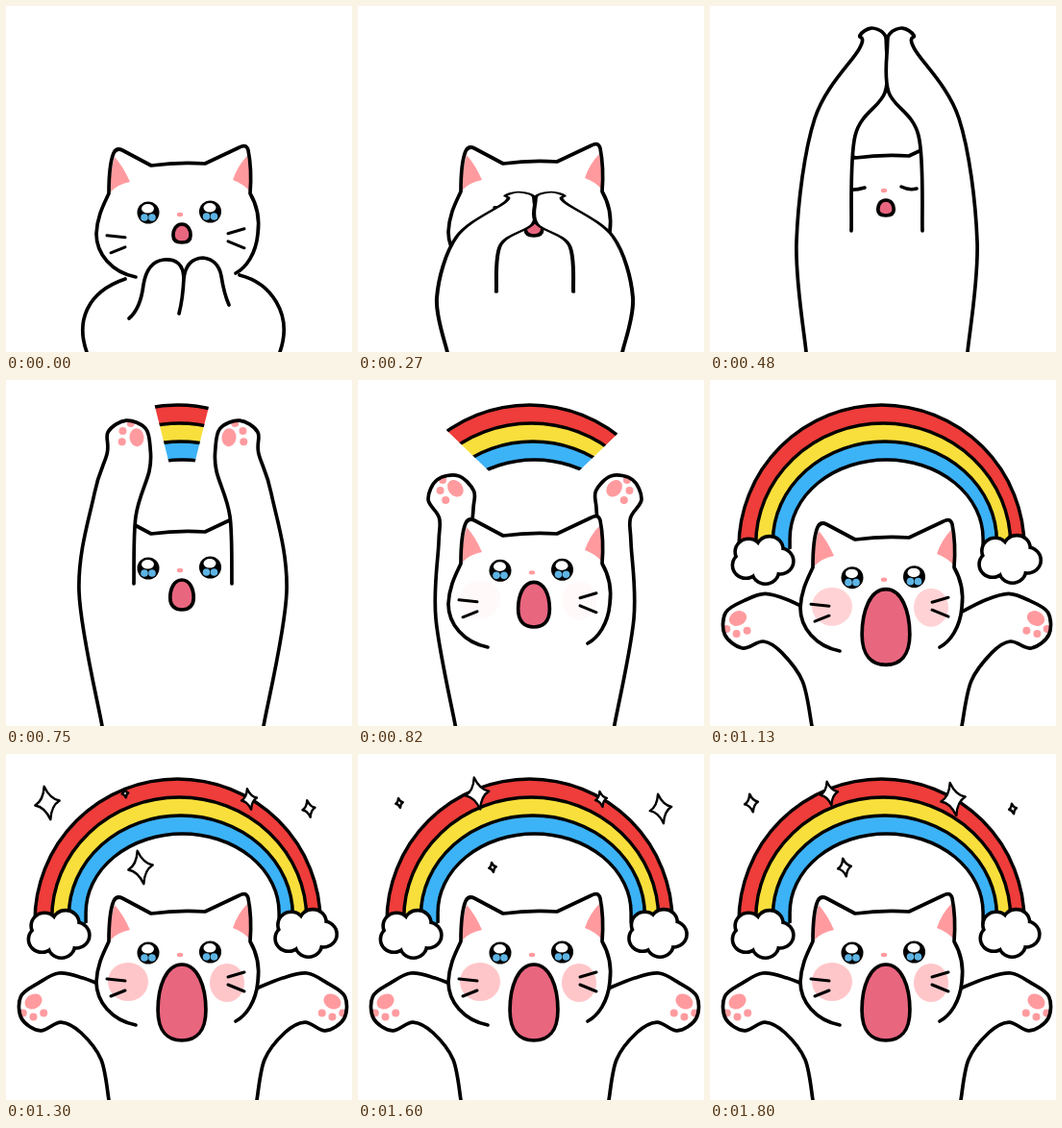
These frames come from a looping animation (360 px wide and 360 px high, 1.9 s). An HTML page with a canvas:

```html
<!DOCTYPE html>
<html lang="en">
<head>
<meta charset="utf-8">
<title>Rainbow cat</title>
<style>
  html, body { margin: 0; width: 100%; height: 100%; overflow: hidden; background: #fff; }
  canvas { display: block; width: 100vw; height: 100vh; }
</style>
</head>
<body>
<canvas id="stage" width="360" height="360"></canvas>
<script>
const ctx = document.getElementById('stage').getContext('2d');
const LOOP = 1900, AXIS = 184, INK = '#000', PINK = '#ff9b9f', BLUSH = '#ffc6c9';
const BANDS = ['#ee3d3a', '#f9df3b', '#3cb2f7'];
const TAU = 2 * Math.PI;
const rad = deg => deg * Math.PI / 180;
const lerp = (a, b, k) => a + (b - a) * k;
const clamp = v => Math.max(0, Math.min(1, v));

// Left arm only: outer edge, hand centre, inner edge as points, then hand radius and angle
const poses = {
  pray: { eye: 215, gape: 9.5, lift: 0, blush: 0, sweep: 0 },
  reach: {
    eye: 190, gape: 8, lift: -8, blush: 0, sweep: 0, radius: 15, angle: 265,
    arm: [100,360, 90,245, 109,117, 169,38, 182,90, 151,135, 147,234]
  },
  up: {
    eye: 196, gape: 15.5, lift: -6, blush: 0, sweep: 14, radius: 24, angle: 265,
    arm: [100,360, 76,220, 92,118, 127,66, 149,95, 135,142, 133,212]
  },
  spread: {
    eye: 203, gape: 39, lift: 0, blush: .3, sweep: 110, radius: 25, angle: 165,
    arm: [104,360, 91,305, 68,271, 38,237, 62,211, 85,221, 110,240]
  },
  rest: {
    eye: 207, gape: 39.5, lift: 0, blush: 1, sweep: 110, radius: 25, angle: 150,
    arm: [107,360, 99,318, 78,290, 38,263, 55,228, 80,233, 110,245]
  }
};

// x, y, phase of the twinkle
const sparkles = [[43, 51, 0], [140, 118, 0], [315, 57, .3], [124, 41, .5], [253, 47, .75]];

function blend(a, b, k) {
  const out = { ...b };
  for (const key in a) {
    out[key] = key === 'arm' ? a.arm.map((v, i) => lerp(v, b.arm[i], k)) : lerp(a[key], b[key], k);
  }
  return out;
}

function paint(path, fill, width = 3.7) {
  if (fill) { ctx.fillStyle = fill; ctx.fill(path); }
  if (!width) return;
  ctx.lineWidth = width;
  ctx.strokeStyle = INK;
  ctx.stroke(path);
}

const shape = (d, fill, width) => paint(new Path2D(d), fill, width);

function oval(x, y, rx, ry, fill, turn = 0) {
  const p = new Path2D();
  p.ellipse(x, y, rx, ry, turn, 0, TAU);
  paint(p, fill, 0);
}

function smooth(pts) {
  const p = new Path2D(), at = i => pts[Math.max(0, Math.min(pts.length - 1, i))];
  p.moveTo(...pts[0]);
  for (let i = 0; i < pts.length - 1; i++) {
    const [a, b, c, d] = [at(i - 1), at(i), at(i + 1), at(i + 2)];
    p.bezierCurveTo(b[0] + (c[0] - a[0]) / 6, b[1] + (c[1] - a[1]) / 6,
      c[0] - (d[0] - b[0]) / 6, c[1] - (d[1] - b[1]) / 6, ...c);
  }
  return p;
}

const around = ([x, y], r, deg) => [x + r * Math.cos(rad(deg)), y + r * Math.sin(rad(deg))];

function drawArm({ arm, radius, angle }, pads) {
  const pts = [];
  for (let i = 0; i < arm.length; i += 2) pts.push([arm[i], arm[i + 1]]);
  const hand = pts[3], end = pts[pts.length - 1];
  const rim = [-110, -55, 0, 55, 110].map(turn => around(hand, radius, angle + turn));
  pts.splice(3, 1, ...rim);

  const line = smooth(pts), body = new Path2D(line);
  body.lineTo(AXIS, end[1] + 75);
  body.lineTo(AXIS, 360);
  paint(body, '#fff', 0);
  if (pads) {
    ctx.save();
    ctx.clip(body);
    const palm = around(hand, 11, angle + 60);
    oval(...palm, 9.5, 7.5, PINK, rad(angle));
    for (const turn of [-42, 0, 42]) oval(...around(palm, 16, angle - 60 + turn), 4, 4, PINK);
    ctx.restore();
  }
  paint(line);
}

function drawArms(pose, pads, tall = 1, wide = 1) {
  for (const side of [1, -1]) {
    ctx.save();
    ctx.translate(AXIS, 360);
    ctx.scale(side * wide, tall);
    ctx.translate(-AXIS, -360);
    drawArm(pose, pads);
    ctx.restore();
  }
}

function drawHead(dy) {
  ctx.save();
  ctx.translate(0, dy);
  const p = new Path2D('M135 282C110 277 94 258 94 237C95 218 102 206 107 195Q107 165 112 153Q115 147 121 150L151 166Q180 162 207 164L243 147Q250 143 252 150Q256 170 254 195C261 207 264 222 262 237C260 258 250 272 239 278');
  paint(p, '#fff', 0);
  shape('M113 157Q108 172 108 194Q117 185 129 183Q122 167 113 157Z', PINK, 0);
  shape('M251 156Q241 166 236 181Q247 185 254 193Q255 172 251 156Z', PINK, 0);
  paint(p);
  ctx.restore();
}

function drawEye(x, y) {
  oval(x, y, 11.5, 11.5, INK);
  for (const side of [-1, 1]) oval(x + side * 4, y + 5, 3.8, 3.8, '#5db4e4');
  oval(x - .5, y - 4.2, 6.5, 4.8, '#fff');
}

function drawMouth(x, top, ry) {
  const rx = 4 + ry * .53, y = top + ry, p = new Path2D();
  p.moveTo(x, top);
  p.bezierCurveTo(x + rx * .66, top, x + rx, y - ry * .42, x + rx, y + ry * .2);
  p.bezierCurveTo(x + rx, y + ry * .75, x + rx * .6, y + ry, x, y + ry);
  p.bezierCurveTo(x - rx * .6, y + ry, x - rx, y + ry * .75, x - rx, y + ry * .2);
  p.bezierCurveTo(x - rx, y - ry * .42, x - rx * .66, top, x, top);
  paint(p, '#e9667f');
}

function drawFace({ eye, gape, blush }, closed, whiskers) {
  ctx.globalAlpha = blush;
  oval(127, eye + 30, 21, 20, BLUSH);
  oval(230, eye + 31, 18, 20, BLUSH);
  ctx.globalAlpha = 1;
  if (whiskers) {
    ctx.save();
    ctx.translate(0, (eye - 207) * .6);
    shape('M105 234L124 236M109 252L124 246M231 232L248 227M231 240L248 247', null, 3);
    ctx.restore();
  }
  if (closed) {
    shape(`M142 ${eye + 1}Q152 ${eye + 2} 161 ${eye - 1}M199 ${eye - 2}Q207 ${eye + 2} 215 ${eye}`, null, 3.5);
  } else {
    drawEye(148, eye);
    drawEye(212.5, eye - 1);
  }
  oval(181, eye + 2, 3.2, 2.2, PINK);
  drawMouth(183, eye + 12, gape);
}

function drawRainbow(sweep) {
  const arch = (i, p = new Path2D()) => {
    const x = 178.5 + 1.7 * i, rx = 148.5 - 16 * i;
    p.moveTo(x - rx, 186);
    p.ellipse(x, 174 - 3 * i, rx, 148 - 22 * i, 0, Math.PI, 0);
    p.lineTo(x + rx, 186);
    return p;
  };
  ctx.save();
  const wedge = new Path2D();
  wedge.moveTo(183, 140);
  wedge.arc(183, 140, 300, rad(-90 - sweep), rad(-90 + sweep));
  ctx.clip(wedge);
  BANDS.forEach((color, i) => {
    ctx.fillStyle = color;
    ctx.fill(arch(i + 1, arch(i)), 'evenodd');
  });
  for (let i = 0; i <= BANDS.length; i++) paint(arch(i), null, 3.5);
  ctx.restore();
}

function drawCloud(x, y, width) {
  for (const [grow, color] of [[1.8, INK], [-1.8, '#fff']]) {
    oval(x, y, 20 * width, 15, color);
    for (let i = 0; i < 5; i++) {
      const a = rad(-65 + 72 * i);
      oval(x + 19 * width * Math.cos(a), y + 12 * Math.sin(a), 14 + grow, 13.5 + grow, color);
    }
  }
}

function drawSparkle(x, y, h) {
  const w = h * .74, c = h * .2;
  ctx.save();
  ctx.translate(x, y);
  ctx.rotate(rad(-11));
  shape(`M0 ${-h}Q${c} ${-c} ${w} 0Q${c} ${c} 0 ${h}Q${-c} ${c} ${-w} 0Q${-c} ${-c} 0 ${-h}Z`, '#fff', 2.4);
  ctx.restore();
}

function praying() {
  shape('M84 360C73 329 83 298 124 284M243 280C275 288 299 320 285 360');
  drawHead(0);
  drawFace(poses.pray, false, true);
  shape('M128 325Q140 315 143 290Q147 266 164 264Q184 262 185 283Q184 305 180 320', '#fff');
  shape('M185 284Q187 263 205 262Q221 264 224 281Q227 300 232 311', '#fff');
}

function stretching(t) {
  const k = clamp((Math.floor((t - 270) / 70) + 1) / 4);
  const pose = blend(poses.pray, poses.reach, k);
  drawHead(pose.lift);
  drawFace(pose, true, false);
  drawArms(pose, false, 1 - .9 * (1 - k) ** 2, 1 + .12 * Math.sin(Math.PI * k));
}

function opening(t) {
  const open = clamp(Math.floor((t - 750) / 70) / 3);
  const settle = clamp(Math.floor((t - 990) / 70) / 3);
  const pose = blend(blend(poses.up, poses.spread, open), poses.rest, settle);
  const twinkle = t >= 1300;
  const turn = twinkle ? (Math.floor(t / 100) * 100 - 1300) / 700 : 0;

  drawRainbow(pose.sweep);
  if (open) {
    drawArms(pose, true);
    if (open === 1) {
      drawCloud(54, 187, 1);
      drawCloud(311, 186, .96 + .06 * Math.cos(TAU * turn));
    }
    drawHead(pose.lift);
    drawFace(pose, false, true);
  } else {
    drawHead(pose.lift);
    drawFace(pose, false, false);
    drawArms(pose, true);
  }
  if (twinkle) {
    for (const [x, y, phase] of sparkles) drawSparkle(x, y, 11 + 6.5 * Math.cos(TAU * (turn - phase)));
  }
}

function draw(time) {
  const t = time % LOOP;
  ctx.fillStyle = '#fff';
  ctx.fillRect(0, 0, 360, 360);
  ctx.lineCap = ctx.lineJoin = 'round';
  if (t < 270) praying();
  else if (t < 750) stretching(t);
  else opening(t);
}

function tick() {
  draw(performance.now());
  requestAnimationFrame(tick);
}
tick();
</script>
</body>
</html>
```
